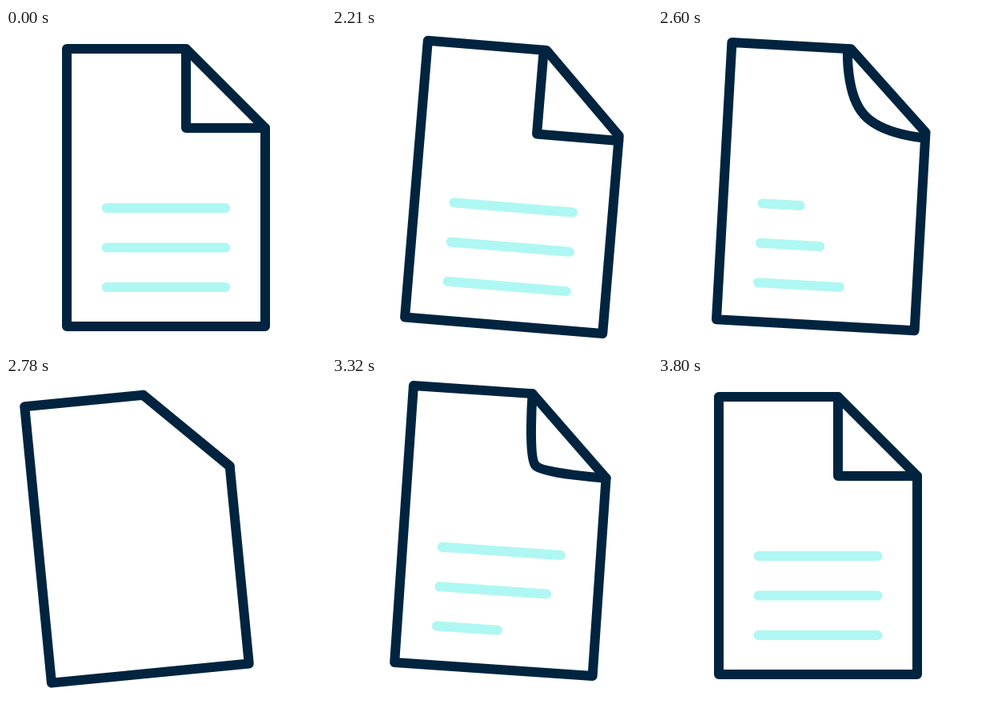
Animation of 400 by 400 pixels, one loop 3.83 s. Source, as an HTML page:

```html
<!DOCTYPE html>
<html lang="en">
<head>
<meta charset="utf-8">
<title>Document</title>
<style>
  html, body { margin: 0; width: 100%; height: 100%; overflow: hidden; background: #fff; }
  svg { display: block; width: 100%; height: 100%; }
  path { fill: none; stroke-width: 12; stroke-linecap: round; stroke-linejoin: round; }
  .ink { stroke: #00243f; }
  .text { stroke: #aff7f3; }
</style>
</head>
<body>
<svg viewBox="0 0 400 400">
  <g id="page">
    <path class="text"/>
    <path class="text"/>
    <path class="text"/>
    <path class="ink" id="fold"/>
    <path class="ink" d="M76 26H225L324 125V373H76Z"/>
  </g>
</svg>
<script>
const LOOP = 3830, REST = 2000, STEP = 30, END = 60;
const FLAT = 49.5; // crease depth at which the fold lies on the cut corner

const page = document.getElementById('page');
const fold = document.getElementById('fold');
const lines = document.querySelectorAll('.text');

const clamp = v => Math.min(1, Math.max(0, v));
const ramp = (k, from, to) => {
  const s = clamp((k - from) / (to - from));
  return s * s * (3 - 2 * s);
};
const easeOut = s => 1 - (1 - s) ** 3;

// Swing from rest through the given [step, value] extremes and back to rest
function swing(k, ...extremes) {
  let from = 0, value = 0;
  for (const [to, next] of [...extremes, [END, 0]]) {
    value += (next - value) * ramp(k, from, to);
    if (k <= to) break;
    from = to;
  }
  return value;
}

function drawFold(k) {
  const slide = ramp(k, 0, 15) - ramp(k, 15, 25);
  const d = FLAT * (ramp(k, 15, 25) - ramp(k, 29, 50));
  const x = 225 - 8 * slide, y = 125 + 13.5 * slide;
  fold.setAttribute('d',
    `M${x} 26C${x} 26 ${x} ${y - 2 * d} ${x + d} ${y - d}` +
    `C${x + 2 * d} ${y} 324 ${y} 324 ${y}`);
}

function drawLine(line, i, k) {
  const start = 26.2 + 6.7 * i;
  const part = k < start
    ? 1 - ramp(k, 15 + i, 23 + i)
    : easeOut(clamp((k - start) / 20.7));
  line.style.display = part > 0 ? '' : 'none';
  line.setAttribute('d', `M125.5 ${225 + 49.5 * i}h${148.8 * part}`);
}

function render(time) {
  const k = Math.max(0, Math.floor((time % LOOP - REST) / STEP + 1e-6));
  const x = swing(k, [13.5, 55], [26, -36.5], [30, -36], [46, 16]);
  const y = swing(k, [17, -1.6], [38, 1], [46, -7.3]);
  const tilt = swing(k, [13.5, 9], [30.3, -8.4], [46, 4.5]);
  page.setAttribute('transform', `translate(${x} ${y}) rotate(${tilt} 200 199.5)`);
  drawFold(k);
  lines.forEach((line, i) => drawLine(line, i, k));
}

function tick() {
  render(performance.now());
  requestAnimationFrame(tick);
}
tick();
</script>
</body>
</html>
```
